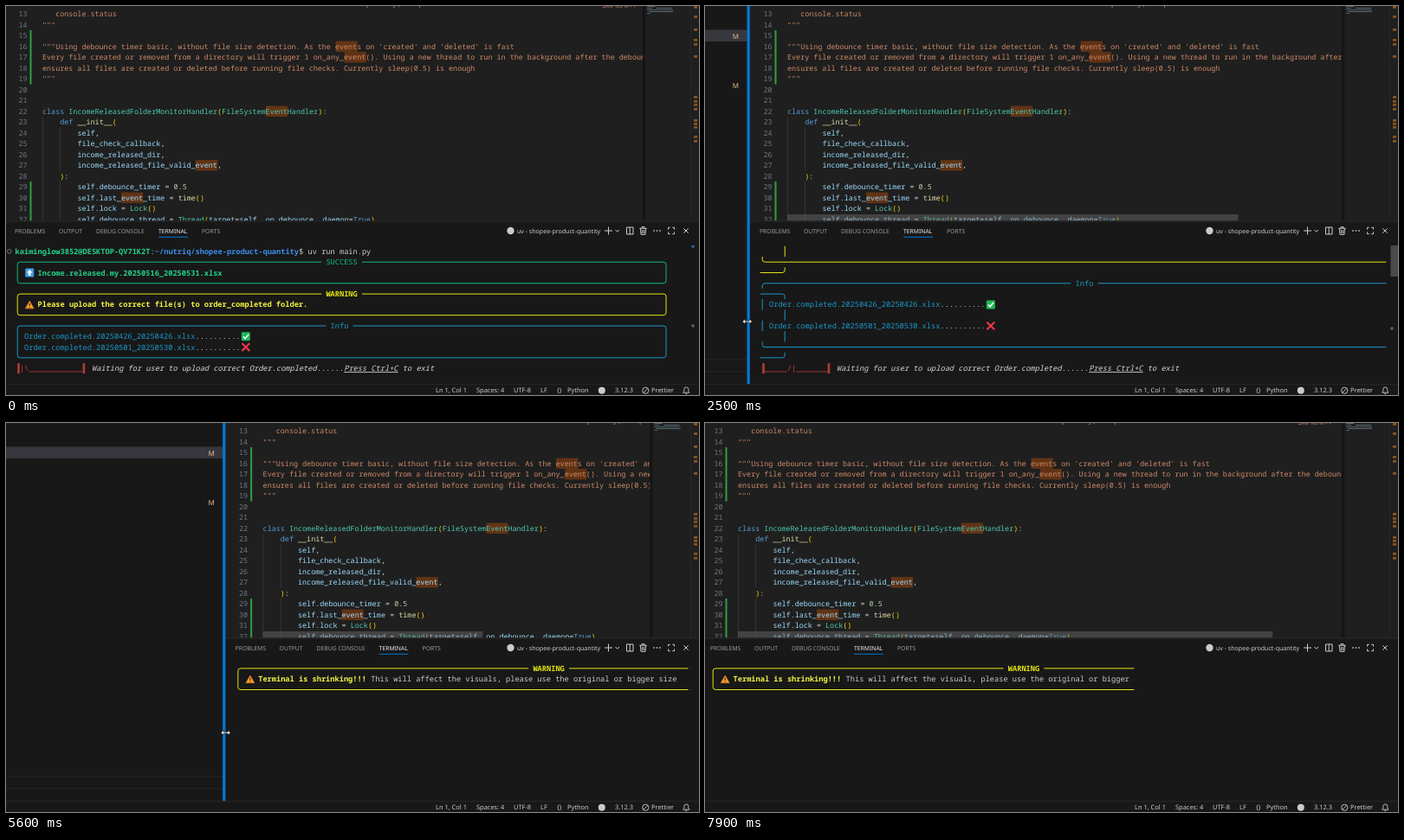
Write an HTML page that moves like this. It is 800 by 450 pixels and loops after 8 s.

```html
<!DOCTYPE html>
<html lang="en">
<head>
<meta charset="utf-8">
<title>Terminal resize</title>
<style>
html, body { margin: 0; width: 100%; height: 100%; overflow: hidden; background: #1f1f1f; }
svg { display: block; width: 800px; height: 450px; }
text { white-space: pre; text-rendering: geometricPrecision; }
.code { font: 8.42px "Noto Sans Mono", monospace; }
.term { font: 8.667px "Noto Sans Mono", monospace; }
.ui { font: 7.45px "Noto Sans", sans-serif; fill: #ccc; }
.tab { font: 6.8px "Noto Sans", sans-serif; fill: #9d9d9d; }
.b { font-weight: 700; }
.i { font-style: italic; }
.line { fill: none; stroke: #ccc; }
</style>
</head>
<body>
<svg id="stage" viewBox="0 0 800 450" xmlns="http://www.w3.org/2000/svg">
  <defs>
    <linearGradient id="shade"><stop offset="0" stop-color="#111"/><stop offset="1" stop-color="#111" stop-opacity="0"/></linearGradient>
  </defs>
  <rect width="800" height="450" fill="#1f1f1f"/>
  <g id="code" class="code"></g>
  <rect id="hbar" y="241" height="8" fill="#797979" fill-opacity=".4"/>
  <g id="map"></g>
  <g id="ruler"></g>
  <rect y="248.5" width="800" height="190" fill="#181818"/>
  <rect y="248.5" width="800" height="1" fill="#2b2b2b"/>
  <g id="tabs" class="tab"></g>
  <g id="term" class="term"></g>
  <rect x="787.5" y="270" width="3" height="166" fill="#181818"/>
  <g id="marks"></g>
  <g id="tools" class="line"></g>
  <g id="side"></g>
  <g id="status" class="ui"></g>
  <path id="cursor" d="M-5.5 0L-2.5-2.8V-.7H2.5V-2.8L5.5 0L2.5 2.8V.7H-2.5V2.8Z" fill="#fff" stroke="#000" stroke-width=".5"/>
</svg>
<script>
const $ = id => document.getElementById(id);
const LOOP = 8000, STEP = 100;
const CODE_W = 5.053, CODE_H = 12.5;
const CELL = 5.2, ROW = 12.3, ROW0 = 283.9, WIDE = 145, SMALL = 139;
const GREEN = '#0dbc79', LIME = '#23d18b', YELLOW = '#e5e510', CYAN = '#1a98c8', RED = '#d6453d';

const rect = (x, y, w, h, fill, more = '') =>
  `<rect x="${x}" y="${y}" width="${w}" height="${h}" fill="${fill}" ${more}/>`;
const text = (x, y, s, fill, more = '') =>
  `<text x="${x}" y="${y}" ${fill ? `fill="${fill}"` : ''} ${more}>${s}</text>`;
const path = (d, stroke, more = '') =>
  `<path d="${d}" fill="none" stroke="${stroke}" ${more}/>`;

// ---- Editor: the first letter of each part picks its colour
const COLORS = { o: '#ce8a68', b: '#569cd6', t: '#4ec9b0', y: '#ffd700', f: '#dcdcaa', v: '#9cdcfe', w: '#d4d4d4', n: '#b5cea8' };
const SELF = 'v        self|w.|v';
const LINES = {
  12: 'o' + ' '.repeat(74) + 'p     y,    p' + ' '.repeat(41) + 'g_p_y_()',
  13: 'o   console.status',
  14: 'o"""',
  16: `o"""Using debounce timer basic, without file size detection. As the events on 'created' and 'deleted' is fast`,
  17: 'oEvery file created or removed from a directory will trigger 1 on_any_event(). Using a new thread to run in the background after the debounce time',
  18: 'oensures all files are created or deleted before running file checks. Currently sleep(0.5) is enough',
  19: 'o"""',
  22: 'bclass |tIncomeReleasedFolderMonitorHandler|y(|tFileSystemEventHandler|y)|w:',
  23: 'b    def |f__init__|y(',
  24: 'v        self|w,',
  25: 'v        file_check_callback|w,',
  26: 'v        income_released_dir|w,',
  27: 'v        income_released_file_valid_event|w,',
  28: 'y    )|w:',
  29: SELF + 'debounce_timer|w = |n0.5',
  30: SELF + 'last_event_time|w = |ftime|y()',
  31: SELF + 'lock|w = |tLock|y()',
  32: SELF + 'debounce_thread|w = |tThread|y(|vtarget|w=|vself|w.|v_on_debounce|w, |vdaemon|w=|bTrue|y)'
};

function buildCode() {
  const mid = n => 9.3 + (n - 13) * CODE_H;
  const span = (x, a, b, w, fill) => rect(x, mid(a) - 6.25, w, (b - a + 1) * CODE_H, fill);
  let out = span(-14.5, 15, 19, 2, '#2ea043') + span(-14.5, 29, 32, 2, '#2ea043');
  out += span(0, 23, 32, .7, '#3c3c3c') + span(20.2, 24, 27, .7, '#3c3c3c') + span(20.2, 29, 32, .7, '#3c3c3c');
  for (let n = 12; n <= 32; n++) {
    const y = mid(n), parts = (LINES[n] || 'o').split('|');
    const plain = parts.map(p => p.slice(1)).join('');
    for (const hit of plain.matchAll(/event/gi))
      out += rect(hit.index * CODE_W, y - 6.2, 5 * CODE_W, 12.4, '#623315');
    if (n > 12) out += text(-27.6, y + 3, n, '#6e7681');
    let col = 0;
    for (const p of parts) {
      const s = p.slice(1), word = s.trimStart();
      if (word) out += text((col + s.length - word.length) * CODE_W, y + 3, word, COLORS[p[0]]);
      col += s.length;
    }
  }
  $('code').innerHTML = out;
}

function buildFixed() {
  $('map').innerHTML = rect(0, 0, 70, 249, '#1f1f1f') + rect(0, 0, 5, 249, 'url(#shade)') +
    [[5, 0, 9], [5, 2, 6], [16, 2, 18], [5, 4, 30], [7, 6, 28], [5, 8, 4]]
      .map(([x, y, w], i) => rect(x, y, w, 1, i % 2 ? '#4d5f6e' : '#5a6a70')).join('');
  $('ruler').innerHTML = rect(790, 0, .7, 249, '#2b2b2b') +
    [0, 11, 26, 38, 43, 57, 104, 109, 113, 118, 131, 135, 139, 150, 155]
      .map(y => rect(794, y, 4, 2.8, '#8a5420')).join('');

  $('tabs').innerHTML = [[13, 'PROBLEMS'], [64, 'OUTPUT'], [107, 'DEBUG CONSOLE'], [179, 'TERMINAL'], [229, 'PORTS']]
    .map(([x, s]) => text(x, 262.5, s, '', s === 'TERMINAL' ? 'style="fill:#eee"' : '')).join('') +
    rect(179, 266.8, 34, 1, '#0078d4');

  $('tools').innerHTML = '<circle cx="582.5" cy="260" r="4.2" fill="#ccc" stroke="none"/>' +
    text(590, 262.6, 'uv - shopee-product-quantity', '#ccc', 'stroke="none" style="font:7.05px \'Noto Sans\',sans-serif"') +
    '<path d="M691 260H700M695.5 255.5V264.5M703.5 259L705.7 261.2L708 259M716.5 256H724V264H716.5ZM720.2 256V264"/>' +
    '<path d="M731.3 257.3H739.7M734 257V255.6H737V257M732.4 257.5L733 264.3H738L738.6 257.5M734.5 259V263M736.5 259V263"/>' +
    '<path d="M747.3 260H748.8M750.8 260H752.3M754.3 260H755.8" stroke-width="1.4"/>' +
    '<path d="M764.5 258.5V256.3H766.7M769.3 256.3H771.5V258.5M771.5 261.5V263.7H769.3M766.7 263.7H764.5V261.5M782.3 257.3L787.7 262.7M787.7 257.3L782.3 262.7"/>';

  $('status').innerHTML = rect(0, 437.5, 800, 12.5, '#181818') + rect(0, 437.3, 800, .8, '#2b2b2b') +
    [[496, 'Ln 1, Col 1'], [543, 'Spaces: 4'], [586, 'UTF-8'], [617, 'LF'], [636, '{}'], [648, 'Python'], [703, '3.12.3'], [745, 'Prettier']]
      .map(([x, s]) => text(x, 447.4, s)).join('') +
    '<circle cx="687.8" cy="444.8" r="4" fill="#ccc"/>' +
    '<g class="line" stroke-width=".9"><circle cx="738.3" cy="444.8" r="3.6"/><path d="M735.8 447.3L740.8 442.3"/>' +
    '<path d="M781.7 447.2H788.9L787.8 445.5V443.5A2.5 2.5 0 0 0 782.8 443.5V445.5ZM784.3 448.6H786.3"/></g>';
}

// ---- Motion of the divider: time, x
const DRAG = [[0, -3], [1800, -3], [2100, 18], [2400, 50], [2700, 50], [2800, 51], [3650, 51], [3800, 75], [4100, 135],
  [4600, 136], [4700, 150], [5300, 240], [5450, 241], [6100, 287], [6300, 289], [6850, 289], [7100, 209], [7900, -7], [8000, -7]];
const LEVEL = [[0, 366], [2500, 365], [3600, 365], [4700, 363], [6800, 352], [8000, 350]];

function along(keys, t) {
  const i = Math.max(1, keys.findIndex(k => k[0] >= t));
  const [t0, a] = keys[i - 1], [t1, b] = keys[i];
  return a + (b - a) * (t - t0) / (t1 - t0);
}
const divider = t => along(DRAG, Math.min(t, LOOP));
const columns = t => Math.floor((791.5 - divider(t) - 13.6) / CELL);

// ---- Terminal
let left = 0;
const X = col => left + col * CELL;
const say = (col, y, s, fill, cls = '', more = '') => text(X(col), y + 3, s, fill, `class="${cls}" ${more}`);

const icons = {
  up: (x, y) => rect(x - 5, y - 5, 10, 10, '#3b9be6', 'rx="1.2"') +
    `<path d="M${x} ${y - 3.7}l3.4 3.6h-2v3.6h-2.8v-3.6h-2z" fill="#fff"/>`,
  warn: (x, y) => `<path d="M${x} ${y - 4}l4.8 8.4h-9.6z" fill="#f5a52a" stroke="#e0782a" stroke-linejoin="round"/>` +
    path(`M${x} ${y - 1.4}v3M${x} ${y + 2.5}v1`, '#222', 'stroke-width="1.1"'),
  ok: (x, y) => rect(x - 5, y - 5, 10, 10, '#1fb85a', 'rx="1.2"') +
    path(`M${x - 3} ${y}l2.2 2.4l4-4.8`, '#fff', 'stroke-width="1.5"'),
  no: (x, y) => path(`M${x - 3.8} ${y - 3.8}l7.6 7.6m0-7.6l-7.6 7.6`, '#e8364a', 'stroke-width="2.2" stroke-linecap="round"')
};

const corner = (w, y, d) => {
  const r = X(w - .5);
  return `H${r - 3}Q${r} ${y} ${r} ${y + d * 3}V${y + d * ROW / 2}`;
};
// Horizontal side of a box; d is 1 for the top and -1 for the bottom
function edge(y, n, w, d, color, title = '') {
  const x = X(.5), gap = Math.floor((w - 4 - title.length) / 2) + 1;
  const hole = title ? `H${X(gap)}M${X(gap + title.length + 2)} ${y}` : '';
  const end = n >= w ? corner(w, y, d) : `H${X(n)}`;
  return path(`M${x} ${y + d * ROW / 2}V${y + d * 3}Q${x} ${y} ${x + 3} ${y}${hole}${end}`, color) +
    (title ? say(gap + 1, y, title, color, title === 'WARNING' ? 'b' : '') : '');
}
const wall = (col, y, color) => path(`M${X(col + .5)} ${y - ROW / 2}v${ROW}`, color);

function shark(t) {
  const k = Math.floor(t / 120) % 26, under = n => '_'.repeat(n);
  return k < 13 ? under(k) + '|\\' + under(12 - k) : under(25 - k) + '/|' + under(k - 13);
}

function waiting(t, cols) {
  const n = Math.min(cols, WIDE), rest = WIDE - n, rows = [];
  const add = (head, tail) => { rows.push(head); if (rest) rows.push(tail); };
  const side = (d, color, title) => add(y => edge(y, n, WIDE, d, color, title),
    y => path(`M${X(0)} ${y}` + corner(rest, y, d), color));
  const mid = (color, body) => add(y => wall(0, y, color) + body(y) + (rest ? '' : wall(WIDE - 1, y, color)),
    y => wall(rest - 1, y, color));
  const order = (range, icon) => mid(CYAN, y => say(2, y, `Order.completed.${range}.xlsx`, CYAN) +
    say(40, y, '..........', '#ccc') + icon(X(51.2), y));

  rows.push(y => `<circle cx="${left - 6.8}" cy="${y}" r="2.3" fill="none" stroke="#777"/>` +
    say(0, y, 'kaiminglow3852@DESKTOP-QV71K2T', LIME, 'b') + say(30, y, ':', '#ccc') +
    say(31, y, '~/nutriq/shopee-product-quantity', '#3b8eea', 'b') + say(63, y, '$ uv run main.py', '#ccc'));
  side(1, GREEN, 'SUCCESS');
  mid(GREEN, y => icons.up(X(3.2), y) + say(5, y, 'Income.released.my.20250516_20250531.xlsx', LIME, 'b'));
  side(-1, GREEN);
  side(1, YELLOW, 'WARNING');
  mid(YELLOW, y => icons.warn(X(3.2), y) + say(5, y, 'Please upload the correct file(s) to order_completed folder.', '#f5f543', 'b'));
  side(-1, YELLOW);
  side(1, CYAN, 'Info');
  order('20250426_20250426', icons.ok);
  order('20250501_20250530', icons.no);
  side(-1, CYAN);
  rows.push(y => rect(X(.5), y - 6, CELL / 2, 12, RED, 'opacity=".8"') + say(1, y, shark(t), RED) +
    rect(X(15), y - 6, CELL / 2, 12, RED, 'opacity=".8"') +
    say(17, y, 'Waiting for user to upload correct Order.completed......', '#d8d8d8', 'i') +
    say(73, y, 'Press Ctrl+C', '#d8d8d8', 'i', 'text-decoration="underline"') +
    say(86, y, 'to exit', '#d8d8d8', 'i'));
  $('marks').innerHTML = rest
    ? rect(791.5, 277, 8.5, 36, '#4a4a4a') + rect(791.5, 371.5, 3, 3, '#666')
    : rect(791.5, 277, 3, 2.5, '#2472c8') + rect(791.5, 368.5, 3, 3, '#666');
  return rows.slice(-12).map((row, i) => row(ROW0 + i * ROW)).join('');
}

function shrinking(t) {
  let n = SMALL;
  for (let s = 3000; s <= t; s += STEP) n = Math.min(n, columns(s));
  const y = ROW0 + ROW;
  const note = 'This will affect the visuals, please use the original or bigger size';
  $('marks').innerHTML = '';
  return edge(ROW0, n, SMALL, 1, YELLOW, 'WARNING') + wall(0, y, YELLOW) + icons.warn(X(3.2), y) +
    say(5, y, 'Terminal is shrinking!!!', '#f5f543', 'b') + say(30, y, note.slice(0, n - 30), '#ccc') +
    (n >= SMALL ? wall(SMALL - 1, y, YELLOW) : '') + edge(y + ROW, n, SMALL, -1, YELLOW);
}

function draw(t) {
  const d = divider(t), start = d + 45;
  const mapX = 790 - Math.min(55, .0943 * (790 - start)), view = mapX - start;
  $('code').setAttribute('transform', `translate(${start} 0)`);
  $('map').setAttribute('transform', `translate(${mapX} 0)`);
  $('tabs').setAttribute('transform', `translate(${d} 0)`);
  $('hbar').setAttribute('x', start);
  $('hbar').setAttribute('width', t < 1900 ? 0 : view * view / 787);

  left = d + 13.6;
  $('term').innerHTML = t < 3000 ? waiting(t, columns(t)) : shrinking(t);

  const letter = y => text(d - 14.5, y, 'M', '#e2c08d', 'text-anchor="middle" style="font:8px \'Noto Sans\',sans-serif"');
  $('side').innerHTML = d < 0 ? '' : rect(0, 0, d, 438, '#181818') + rect(0, 27.5, d, 13.5, '#37373d') +
    rect(0, 408.5, d, .8, '#2b2b2b') + rect(0, 422.5, d, .8, '#2b2b2b') +
    letter(37.8) + letter(95) + rect(d - 1.5, 0, 3.3, 438, '#0078d4');

  const cx = t < 1600 ? -20 : divider(t + 45) - 1.2;
  $('cursor').setAttribute('transform', `translate(${cx} ${along(LEVEL, t)})`);
}

let last = -1;
function tick() {
  const t = Math.floor(performance.now() % LOOP / STEP) * STEP;
  if (t !== last) draw(last = t);
  requestAnimationFrame(tick);
}
buildCode();
buildFixed();
tick();
</script>
</body>
</html>
```
